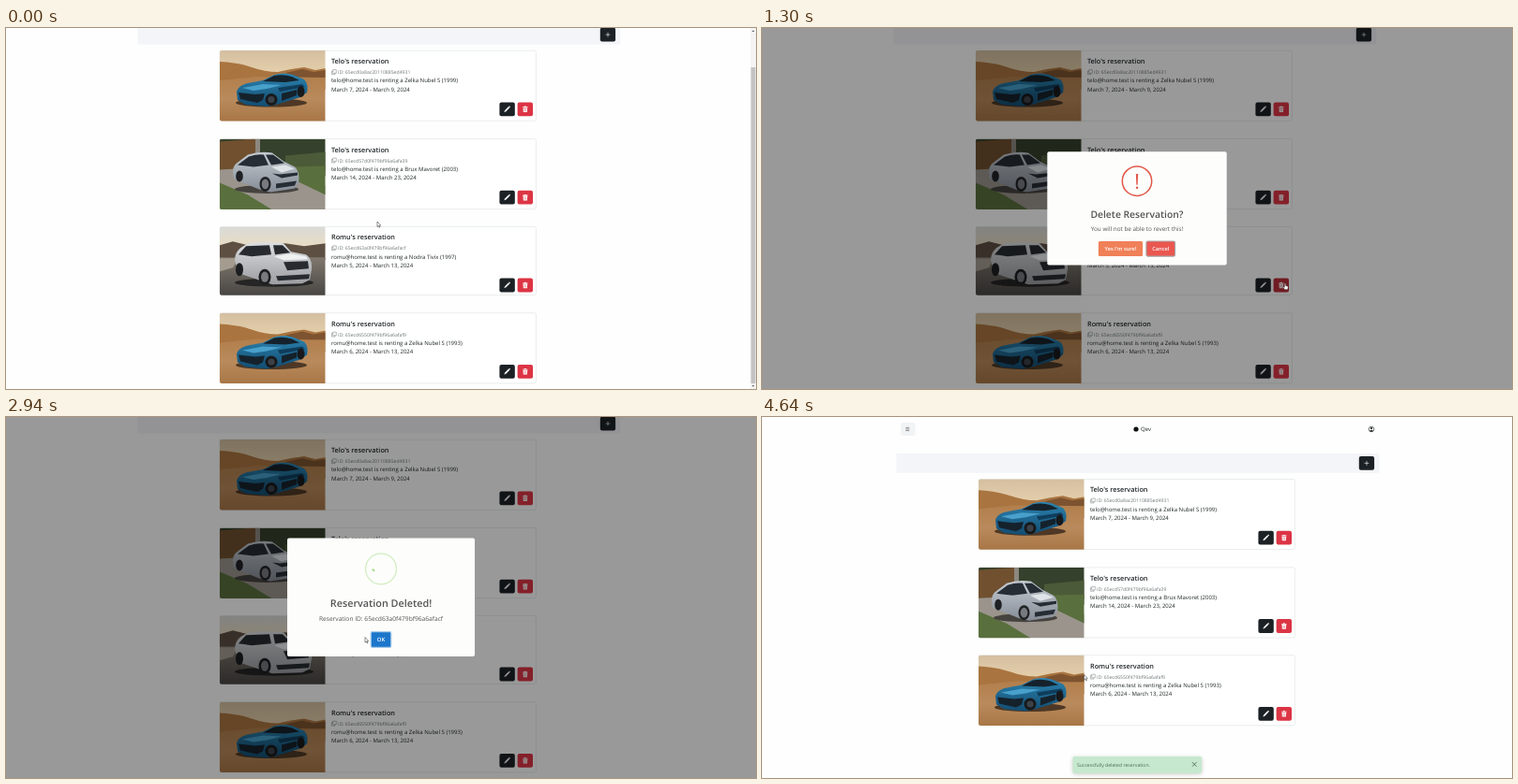
These frames come from a looping animation (800 px wide and 386 px high, 4.67 s). An HTML page:

```html
<!DOCTYPE html>
<html lang="en">
<head>
<meta charset="utf-8">
<title>Reservations</title>
<style>
  html, body { margin: 0; width: 100%; height: 100%; overflow: hidden; background: #fdfefd; }
  svg { display: block; font-family: "Open Sans", "Noto Sans", sans-serif; text-rendering: geometricPrecision; }
  .toast { filter: drop-shadow(0 1px 2px #0003); }
</style>
</head>
<body>
<svg id="stage" width="800" height="386" viewBox="0 0 800 386">
  <defs>
    <linearGradient id="sky" x2="0" y2="1"><stop stop-color="#d3bea0"/><stop offset="1" stop-color="#e9d3ae"/></linearGradient>
    <linearGradient id="sand" x2="0" y2="1"><stop stop-color="#b27f4c"/><stop offset=".5" stop-color="#b98a5c"/><stop offset="1" stop-color="#a87646"/></linearGradient>
    <linearGradient id="paint" x2="0" y2="1"><stop stop-color="#2b83b0"/><stop offset="1" stop-color="#134c70"/></linearGradient>
    <linearGradient id="silver" x2="0" y2="1"><stop stop-color="#c6ccd3"/><stop offset="1" stop-color="#858c96"/></linearGradient>
    <linearGradient id="dusk" x2="0" y2="1"><stop stop-color="#d9dad8"/><stop offset="1" stop-color="#efdcba"/></linearGradient>
    <linearGradient id="road" x2="0" y2="1"><stop stop-color="#80786e"/><stop offset="1" stop-color="#454341"/></linearGradient>
    <linearGradient id="white" x2="0" y2="1"><stop stop-color="#dcdee0"/><stop offset="1" stop-color="#9b9da1"/></linearGradient>
    <clipPath id="frame"><path d="M112.5 0H2Q0 0 0 2V73.5Q0 75.5 2 75.5H112.5Z"/></clipPath>
    <clipPath id="shortFrame"><path d="M112.5 0H2Q0 0 0 2V71.5Q0 73.5 2 73.5H112.5Z"/></clipPath>

    <g id="desert">
      <path fill="url(#sky)" d="M0 0H113V30H0Z"/>
      <path fill="#a9743f" d="M0 12Q20 13 34 18T62 23L76 20 90 18 102 21 113 19V42H0Z"/>
      <path fill="#7d5330" d="M70 24L88 20 100 23 113 21V29L86 30Z"/>
      <path fill="url(#sand)" d="M0 32L40 28 113 29V76H0Z"/>
      <ellipse cx="55" cy="56" rx="38" ry="4.5" fill="#4e3825"/>
      <path fill="url(#paint)" d="M18 44Q20 37 30 35L46 32 58 26Q68 23 78 26L90 31Q95 36 93 45L86 50 60 58 50 60 28 58 19 53Z"/>
      <path fill="#15222c" d="M46 33L58 27Q68 25 77 28L85 32 70 34ZM20 45L38 47 48 46 46 53 40 56 22 52ZM66 46L82 42 82 48 66 54Z"/>
      <path fill="#48a0cb" d="M24 40L46 36 66 37 50 41 36 43Z"/>
      <path fill="#0f3d5b" d="M62 40L88 36 91 39 64 44Z"/>
      <g fill="#17191c"><circle cx="55" cy="52.5" r="6.5"/><ellipse cx="86.5" cy="44" rx="4" ry="6"/></g>
      <circle cx="55" cy="52.5" r="3.6" fill="#3c4147"/>
    </g>

    <g id="driveway">
      <path fill="#35412c" d="M0 0H113V40H0Z"/>
      <path fill="#4b5a38" d="M70 18L113 14V34H70Z"/>
      <path fill="#70502f" d="M0 3L38 0V32L0 34Z"/>
      <path fill="#8d8880" d="M38 0H43V30H38Z"/>
      <path fill="#9a948c" d="M0 33L60 30 113 50V76H0Z"/>
      <path fill="#596f3d" d="M0 47L30 60 56 76H0ZM70 30L113 29V60L84 46Z"/>
      <ellipse cx="50" cy="54" rx="34" ry="4.5" fill="#46433f"/>
      <path fill="url(#silver)" d="M14 36Q14 29 18 26L30 17Q42 13 56 15L68 24 80 30Q86 36 84 47L80 53 54 57 42 54 22 46 15 43Z"/>
      <path fill="#272d34" d="M19 28L31 19Q40 16 47 17L52 28 36 30ZM49 17L57 17 69 26 55 28ZM56 37L64 38 83 36 83 39 66 42ZM60 48L82 45 80 50 60 53Z"/>
      <path fill="#dfe3e7" d="M55 30L70 28 80 32 66 36Z"/>
      <g fill="#1f2124"><ellipse cx="48.5" cy="48.5" rx="6" ry="8"/><ellipse cx="21" cy="40" rx="3.8" ry="6"/></g>
      <ellipse cx="48.5" cy="48.5" rx="3.8" ry="5.4" fill="#777b80"/>
    </g>

    <g id="winter">
      <path fill="url(#dusk)" d="M0 0H113V30H0Z"/>
      <path fill="#5d4f42" d="M0 20L14 16 30 20 70 18 90 21 113 18V36H0Z"/>
      <path fill="url(#road)" d="M0 33H113V76H0Z"/>
      <path fill="#a59c90" d="M0 34L20 34 14 44 0 48Z"/>
      <ellipse cx="58" cy="60" rx="42" ry="4.5" fill="#262525"/>
      <path fill="url(#white)" d="M16 36Q16 28 22 23L30 18Q48 15 68 18L76 27 92 30Q99 34 98 46L96 57 88 61 56 62 44 58 20 50Z"/>
      <path fill="#272b30" d="M20 30L28 21 53 20 55 30 34 32ZM57 20L67 20 75 28 59 30ZM68 38L94 37 95 45 72 47ZM60 53L96 51 95 56 62 58Z"/>
      <path fill="#eef0f1" d="M58 32L76 29 92 32 94 35 68 36Z"/>
      <g fill="#1d1e20"><ellipse cx="48" cy="54" rx="6.5" ry="8.5"/><ellipse cx="21" cy="46" rx="4" ry="7"/></g>
      <ellipse cx="48" cy="54" rx="4" ry="5.6" fill="#777a7e"/>
    </g>
  </defs>
</svg>
<script>
const LOOP = 4670, LIST_REFRESH = 3785;
const stage = document.getElementById('stage');
const $ = id => document.getElementById(id);

const text = (x, y, size, str, fill = '#212529', extra = '') =>
  `<text x="${x}" y="${y}" font-size="${size}" fill="${fill}" ${extra}>${str}</text>`;
const box = (x, y, w, h, fill, extra = 'rx="2"') =>
  `<rect x="${x}" y="${y}" width="${w}" height="${h}" fill="${fill}" ${extra}/>`;
const line = (d, stroke, width, extra = '') =>
  `<path d="${d}" fill="none" stroke="${stroke}" stroke-width="${width}" ${extra}/>`;
const centered = 'text-anchor="middle" ';
const bold = 'font-weight="600"';

function card(i, y, h, photo, name, id, car, dates) {
  return `<g id="card${i}" transform="translate(231 ${y})">
    ${box(.2, .2, 337.2, h - .4, '#fefffe', 'rx="2" stroke="#d9dbdd" stroke-width=".5"')}
    <g clip-path="url(#${h < 75 ? 'shortFrame' : 'frame'})"><use href="#${photo}"/></g>
    ${text(119, 14.2, 7.3, name + "'s reservation", '#212529', bold)}
    ${line('M120.7 20.7h3.6v3.6h-3.6zM120.7 22h-1.3v3.6h3.6v-1.3', '#73787d', .5)}
    ${text(126, 25.2, 5.13, 'ID: ' + id, '#73787d')}
    ${text(119, 34.4, 6, `${name.toLowerCase()}@home.test is renting a ${car}`)}
    ${text(119, 43.6, 6, dates)}
    ${box(298.4, 55.4, 16.4, 14.8, '#1c2125')}
    ${line('M304.5 64.8L308.6 60.7', '#fff', 1.7)}
    <path d="M303.4 65.9l.5-1.7 1.2 1.2zM309 59.2l1.1 1.1-.8.7-1.1-1.1z" fill="#fff"/>
    ${box(317.6, 55.4, 16.4, 14.8, '#dc3545', `rx="2" id="bin${i}"`)}
    <path d="M323.1 60.2h1.6l.4-.6h1.5l.4.6h1.6v.8h-5.5zM323.5 61.4h4.7l-.3 4.6h-4.1z" fill="#fff"/>
    ${line('M324.9 62.2v3M325.9 62.2v3M326.9 62.2v3', '#dc3545', .35)}
  </g>`;
}

const page = `<g id="page">
  ${box(148, 6, 15.5, 14, '#f1f3f5')}
  ${line('M153.2 11.4h4M153.2 13h4M153.2 14.6h4', '#333', .5)}
  <circle cx="399" cy="13" r="2.6" fill="#111"/>
  ${text(404, 15.4, 6, 'Qev')}
  <circle cx="650" cy="13" r="2.8" fill="none" stroke="#16191c" stroke-width=".6"/>
  <circle cx="650" cy="12.2" r="1.1" fill="#16191c"/>
  <path d="M648 14.9q2-2 4 0q-2 1.6-4 0" fill="#16191c"/>
  ${box(143.3, 39, 515, 20.8, '#f4f5f9', '')}
  ${box(636.8, 42, 16.3, 14.7, '#1c2125')}
  ${line('M642.6 49.4h4.8M645 47v4.8', '#fff', .6)}
  ${card(0, 66.3, 75.5, 'desert', 'Telo', '65ecd0a8ac20110885ed4931', 'Zelka Nubel S (1999)', 'March 7, 2024 - March 9, 2024')}
  ${card(1, 160.7, 75.5, 'driveway', 'Telo', '65ecd57d0f479bf96a6afa39', 'Brux Mavoret (2003)', 'March 14, 2024 - March 23, 2024')}
  ${card(2, 254.5, 73.5, 'winter', 'Romu', '65ecd63a0f479bf96a6afacf', 'Nodra Tivix (1997)', 'March 5, 2024 - March 13, 2024')}
  ${card(3, 346.8, 75.5, 'desert', 'Romu', '65ecd6550f479bf96a6afaf9', 'Zelka Nubel S (1993)', 'March 6, 2024 - March 13, 2024')}
</g>`;

const scrollbar = `<g id="scrollbar">
  ${box(794, 0, 6, 386, '#f3f4f3', '')}${box(794.6, 42, 4.8, 338, '#c2c3c2', '')}
  <path d="M795.6 4l1.4-1.8 1.4 1.8zM795.6 382l1.4 1.8 1.4-1.8z" fill="#666"/>
</g>`;

const toast = `<g id="toast" class="toast">
  ${box(331.5, 363, 137.5, 18, '#c6e8ce')}
  ${text(336, 373.8, 5.15, 'Successfully deleted reservation.', '#4d6d58')}
  ${line('M458.8 369l4.8 4.8M463.6 369l-4.8 4.8', '#47604f', .8)}
</g>`;

const dialog = (id, title, message, body) => `<g id="${id}">
  ${box(300, 129.5, 200, 126.6, '#fdfefc')}
  ${text(400, 203, 10.8, title, '#545454', centered + bold)}
  ${text(400, 217.8, 6.65, message, '#545454', centered)}
  ${body}
</g>`;
const button = (x, w, fill, label, extra = '') =>
  box(x, 229.6, w, 16.8, fill, 'rx="1.6" ' + extra) +
  text(x + w / 2, 240.2, 5.9, label, '#fff', centered + bold);

const confirmDialog = dialog('confirm', 'Delete Reservation?', 'You will not be able to revert this!', `
  <circle cx="400" cy="162.4" r="16.4" fill="none" stroke="#e2584a" stroke-width="1.6"/>
  <path d="M398.8 154.4h2.4l-.5 12.2h-1.4z" fill="#e2584a"/><circle cx="400" cy="169.8" r="1.3" fill="#e2584a"/>
  ${button(357, 49.4, '#f08058', "Yes I'm sure!", 'id="yes"')}
  ${button(410.4, 32, '#ea5750', 'Cancel', 'stroke="#a9a4a4" stroke-width="1.2"')}`);

const doneDialog = dialog('done', 'Reservation Deleted!', 'Reservation ID: 65ecd63a0f479bf96a6afacf', `
  <circle cx="400" cy="162.4" r="16.4" fill="none" stroke="#a5dc86" stroke-opacity=".45" stroke-width="1.4"/>
  ${line('M390.8 162.6L396.6 168.4 409.4 156', '#a5dc86', 2, 'id="check" pathLength="1"')}
  ${button(389.2, 21.6, '#1c77cb', 'OK', 'id="ok" stroke="#a9cbea" stroke-width="1.2"')}`);

const cursor = `<g id="cursor" fill="#fff" stroke="#222" stroke-width=".5" stroke-linejoin="round">
  <path id="arrow" d="M0 0V5.6L1.3 4.4 2.2 6.4 3 6 2.1 4.2H3.8Z"/>
  <path id="hand" d="M-.7.6a.7.7 0 0 1 1.4 0V2.6l1.9.5q.7.2.6 1l-.4 2.6H-.4L-2.3 4.1q.3-.8 1.6.1z"/>
</g>`;

stage.insertAdjacentHTML('beforeend', page + scrollbar + toast +
  box(0, 0, 800, 386, '#000', 'id="backdrop"') + confirmDialog + doneDialog + cursor);

const clamp = v => Math.min(1, Math.max(0, v));
const ease = p => 1 - (1 - clamp(p)) ** 2.3;
const smooth = p => p * p * (3 - 2 * p);

// Interpolates rows of [position, ...values].
function track(rows, at, curve) {
  const i = rows.findIndex(row => row[0] > at);
  if (i < 0) return rows[rows.length - 1].slice(1);
  const [a, b] = [rows[i - 1], rows[i]];
  const p = curve((at - a[0]) / (b[0] - a[0]));
  return a.slice(1).map((v, k) => v + (b[k + 1] - v) * p);
}

const POP = [[0, .7], [.45, 1.05], [.8, .95], [1, 1]];
const POINTER = [
  [0, 396, 207], [60, 396, 207], [500, 584, 281], [620, 584, 281], [900, 558, 273], [1420, 558, 273],
  [2000, 381.5, 236.5], [2250, 381.5, 236.5], [2500, 383, 235.5], [3000, 383, 235.5],
  [3400, 403.3, 241.5], [3680, 403.3, 241.5], [4450, 343.5, 275.5], [LOOP, 343.5, 275.5]];

const show = (id, on) => $(id).setAttribute('display', on ? 'inline' : 'none');
const within = (t, from, to) => t >= from && t < to;

// Pops a dialog in and out; returns its share of the backdrop.
function playDialog(id, t, open, close) {
  const visible = within(t, open, close + 150);
  show(id, visible);
  if (!visible) return 0;
  const leaving = ease((t - close) / 150);
  const scale = t < close ? track(POP, (t - open) / 300, ease)[0] : 1 - leaving / 2;
  $(id).setAttribute('transform', `translate(400 193) scale(${scale}) translate(-400 -193)`);
  $(id).setAttribute('opacity', 1 - leaving);
  return ease((t - open) / 100) * (1 - ease((t - close) / 100));
}

function draw(t) {
  const refreshed = t >= LIST_REFRESH;
  $('page').setAttribute('transform', refreshed ? '' : 'translate(-3 -42.3)');
  show('card2', !refreshed);
  $('card3').setAttribute('transform', `translate(231 ${refreshed ? 254.5 : 346.8})`);
  show('toast', refreshed);
  $('toast').setAttribute('opacity', ease((t - LIST_REFRESH) / 150));

  const shade = playDialog('confirm', t, 1094, 2225) + playDialog('done', t, 2510, 3580);
  $('backdrop').setAttribute('opacity', .4 * shade);
  show('scrollbar', !refreshed && !shade);

  const onBin = within(t, 820, 1460), onYes = within(t, 1930, 2260), onOk = within(t, 3220, 3600);
  $('bin2').setAttribute('fill', onBin ? '#bb2d3b' : '#dc3545');
  $('yes').setAttribute('fill', onYes ? '#d5744f' : '#f08058');
  $('ok').setAttribute('fill', onOk ? '#1a66ab' : '#1c77cb');

  const drawn = clamp((t - 2915) / 225);
  show('check', drawn > 0);
  $('check').setAttribute('stroke-dasharray', `${drawn} 2`);

  const [x, y] = track(POINTER, t, smooth);
  $('cursor').setAttribute('transform', `translate(${x} ${y})`);
  const pointing = onBin || onYes || onOk;
  show('hand', pointing);
  show('arrow', !pointing);
}

const start = performance.now();
function tick() {
  draw((performance.now() - start) % LOOP);
  requestAnimationFrame(tick);
}
tick();
</script>
</body>
</html>
```
